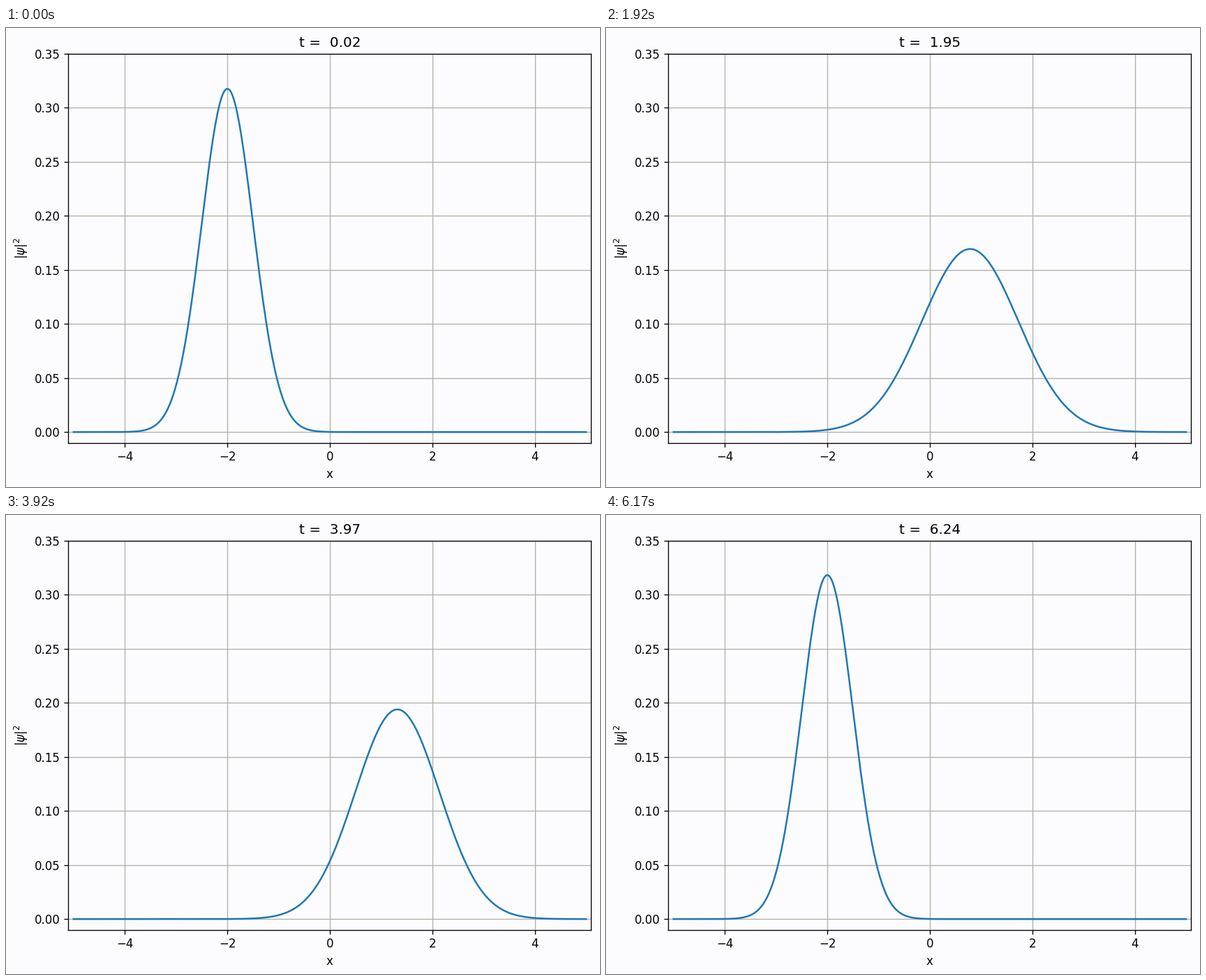
Recreate the animation shown at these times as a matplotlib script. Size 851x658 px, loop 6.26 s.

```python
import numpy as np
import matplotlib.pyplot as plt
from matplotlib.animation import FuncAnimation

W, H, DPI = 851, 658, 120
LOOP_MS, TICK_MS = 6260, 20
FPS, STEPS = 12, 75
DT = 2 * np.pi / 299
STRIDE = 4
PAPER = "#fcfcfe"

plt.rcParams["font.family"] = "DejaVu Sans"

x = np.linspace(-5, 5, 500)


def density(t):
    """Squeezed Gaussian packet swinging in a harmonic well."""
    var = 0.25 * np.cos(t) ** 2 + np.sin(t) ** 2
    center = -2 * np.cos(t)
    return np.exp(-(x - center) ** 2 / (2 * var)) / (2 * np.pi * np.sqrt(var))


fig = plt.figure(figsize=(W / DPI, H / DPI), dpi=DPI, facecolor=PAPER)
left, right, top, bottom = 89.45, 838.35, 36.7, 594.7
ax = fig.add_axes(
    [left / W, 1 - bottom / H, (right - left) / W, (bottom - top) / H],
    facecolor=PAPER,
)
ax.set_xlim(-5.1, 5.1)
ax.set_ylim(-0.01, 0.35)
ax.set_xlabel("x")
ax.set_ylabel(r"$|\psi|^2$")
ax.grid(True, color="#b0b0a9")
line, = ax.plot(x, density(0), color="#1f77b4", lw=1.5)
title = ax.set_title("")


def update(i):
    # Steps run at 12 per second, with changes rounded to 10 ms.
    ms = TICK_MS * i + TICK_MS / 2
    step = min(int((ms + 5) * FPS / 1000), STEPS - 1)
    t = DT * (1 + STRIDE * step)
    # The curve runs one time step ahead of the clock.
    line.set_ydata(density(t + DT))
    title.set_text(f"t = {t:5.2f}")
    return line, title


anim = FuncAnimation(fig, update, frames=LOOP_MS // TICK_MS, interval=TICK_MS,
                     repeat=True, repeat_delay=0, blit=False)
plt.show()
```
